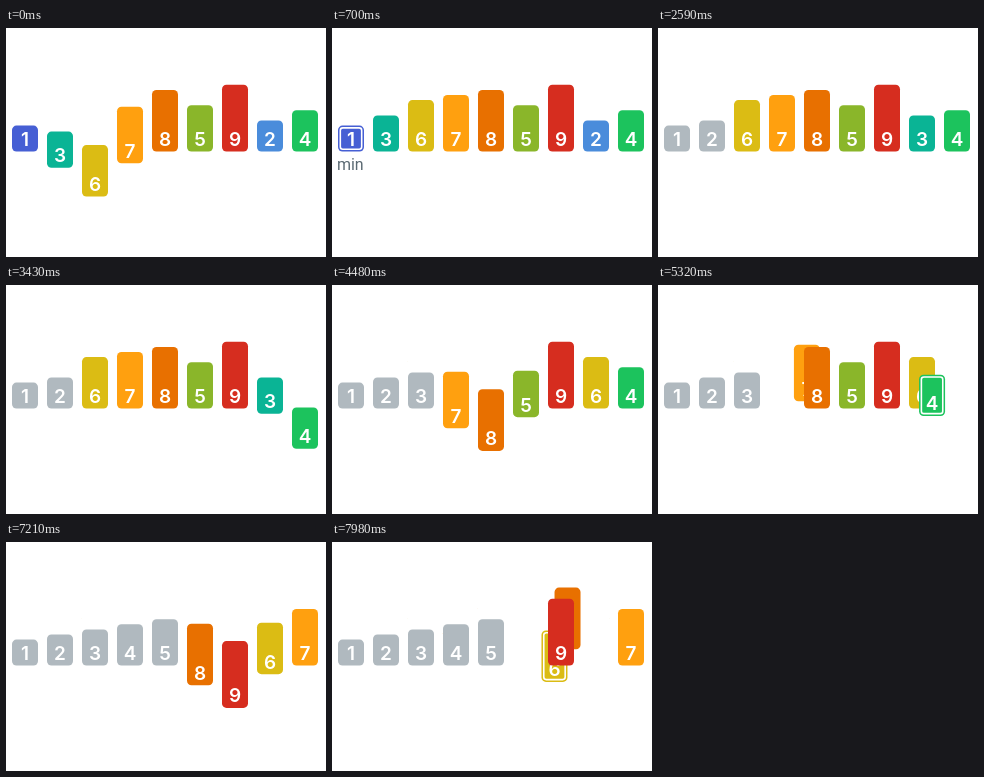
Animation of 320x229 px, one loop 8 s. Source, as an HTML page:

```html
<!DOCTYPE html>
<html lang="en">
<head>
<meta charset="utf-8">
<title>Selection sort</title>
<style>
  html, body { margin: 0; width: 100%; height: 100%; overflow: hidden; background: #fff; }
  svg { display: block; width: 100%; height: 100%; }
  text { text-anchor: middle; }
  .digit { font: 600 19px Inter, "Noto Sans", sans-serif; fill: #fff; }
  .label { font: 400 16px Roboto, "Open Sans", sans-serif; fill: #5b6a73; }
  .ring { fill: none; stroke: #fff; stroke-width: 1.6; }
</style>
</head>
<body>
<svg id="stage" viewBox="0 0 320 229"></svg>
<script>
const LOOP = 8000;
const START = [1, 3, 6, 7, 8, 5, 9, 2, 4];
const COLORS = ['', '#465fd4', '#4a8cdb', '#0ab495', '#1cc35d', '#8ab62a', '#dbbc14', '#ffa00f', '#e87000', '#d62d1f'];
const SORTED = '#b0b9bf';

// Each pass: start of the scan, start of the swap (ms)
const PASSES = [[-290, 955], [1170, 2325], [2763, 3826], [4285, 5264], [5742, 6618], [7015, 7846]];
const STAGGER = 87, DOWN = 116, UP = 148, SWAP = 240;
const DIP = 45, ARC = 17, WIDTH = 26, GAP = 35, LEFT = 6, BASE = 123.6;

const stage = document.getElementById('stage');

function add(parent, tag, attrs) {
  const el = document.createElementNS('http://www.w3.org/2000/svg', tag);
  for (const name in attrs) el.setAttribute(name, attrs[name]);
  return parent.appendChild(el);
}

const bars = START.map(value => {
  const height = 26 + 5.1 * (value - 1);
  const group = add(stage, 'g', {});
  const body = add(group, 'rect', { y: -height, width: WIDTH, height, rx: 4.5 });
  const ring = add(group, 'rect', {
    class: 'ring', x: 2.3, y: 2.3 - height, width: WIDTH - 4.6, height: height - 4.6, rx: 2.5
  });
  add(group, 'text', { class: 'digit', x: WIDTH / 2, y: -5.6 }).textContent = value;
  return { value, group, body, ring };
});
const label = add(stage, 'text', { class: 'label', y: 142 });
label.textContent = 'min';

const clamp = u => Math.max(0, Math.min(1, u));
const smooth = u => u * u * (3 - 2 * u);
const slotX = i => LEFT + GAP * i;

function dip(t) {
  if (t <= 0) return 0;
  return DIP * (t < DOWN ? t / DOWN : 1 - smooth(clamp((t - DOWN) / UP)));
}

function stateAt(t) {
  const order = START.slice();
  const pos = {};
  let sorted = 0, chosen = 0, labelSlot = -1;

  const rest = () => order.forEach((v, i) => { pos[v] = { x: slotX(i), y: BASE }; });
  rest();

  for (let k = 0; k < PASSES.length; k++) {
    const [scan, swap] = PASSES[k];
    if (t < scan) break;
    const found = scan + STAGGER * (order.length - 1 - k) + DOWN + UP + 10;
    const m = order.indexOf(k + 1);
    const end = m === k ? swap - 10 : swap + SWAP;

    if (t >= end) {
      [order[k], order[m]] = [order[m], order[k]];
      sorted = k + 1;
      rest();
      continue;
    }
    for (let i = k; i < order.length; i++) pos[order[i]].y += dip(t - scan - STAGGER * (i - k));
    if (t >= found) {
      chosen = k + 1;
      if (t < swap - 10) labelSlot = m;
    }
    if (t >= swap) {
      const p = smooth((t - swap) / SWAP);
      const dx = (m - k) * GAP * p, dy = ARC * Math.sin(Math.PI * p);
      pos[order[k]].x += dx;
      pos[order[k]].y -= dy;
      pos[order[m]].x -= dx;
      pos[order[m]].y += dy;
    }
    break;
  }
  return { pos, sorted, chosen, labelSlot };
}

function draw(t) {
  const { pos, sorted, chosen, labelSlot } = stateAt(t);
  for (const { value, group, body, ring } of bars) {
    const { x, y } = pos[value];
    group.setAttribute('transform', `translate(${x} ${y})`);
    body.setAttribute('fill', value <= sorted ? SORTED : COLORS[value]);
    ring.setAttribute('visibility', value === chosen ? 'visible' : 'hidden');
  }
  label.setAttribute('visibility', labelSlot < 0 ? 'hidden' : 'visible');
  label.setAttribute('x', slotX(Math.max(labelSlot, 0)) + WIDTH / 2 - 0.7);
}

const began = performance.now();
function tick() {
  draw((performance.now() - began) % LOOP);
  requestAnimationFrame(tick);
}
tick();
</script>
</body>
</html>
```
